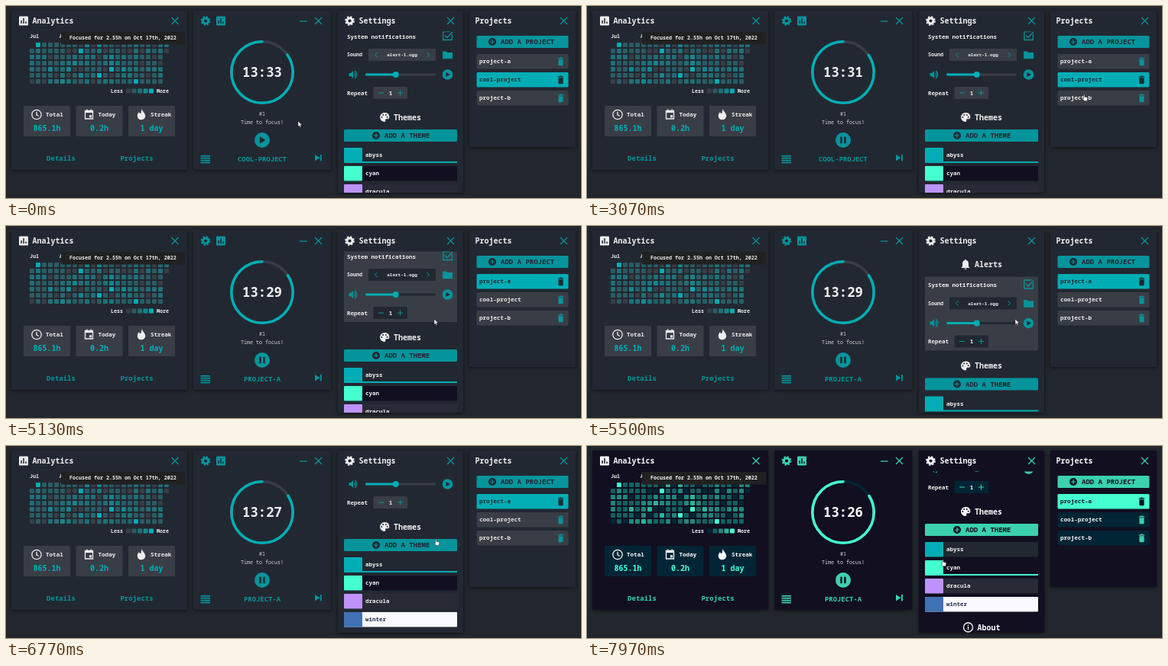
An HTML page that plays this animation: 752 px wide and 252 px high, repeating every 8 s.

```html
<!DOCTYPE html>
<html lang="en">
<head>
<meta charset="utf-8">
<title>Pomodoro timer</title>
<style>
html, body { margin: 0; width: 100%; height: 100%; overflow: hidden; background: #22272e; }
svg { display: block; }
text { font-family: "Noto Sans Mono", "DejaVu Sans Mono", monospace; font-weight: 600; fill: var(--fg); white-space: pre; }
.panel { fill: var(--bg); filter: drop-shadow(0 1px 2px rgba(0,0,0,.55)); }
.bg { fill: var(--bg); } .sec { fill: var(--sec); } .acc { fill: var(--acc); }
.dim { fill: var(--dim); } .fg { fill: var(--fg); } .field { fill: var(--field); } .card { fill: var(--card); }
.line { fill: none; stroke: var(--dim); stroke-width: 1.3; }
.white { fill: none; stroke: var(--fg); stroke-width: 1.3; }
.thin { font-weight: 400; opacity: .88; }
</style>
</head>
<body>
<svg id="stage" width="752" height="252" viewBox="0 0 752 252"></svg>
<script>
const LOOP = 8000;
const stage = document.getElementById('stage');

const THEMES = {
  abyss: { bg: [34, 40, 49], sec: [57, 62, 70], acc: [0, 173, 181], fg: [238, 238, 238] },
  cyan: { bg: [17, 15, 32], sec: [2, 37, 54], acc: [69, 255, 208], fg: [250, 250, 250] }
};

// Maths helpers
const clamp = v => Math.max(0, Math.min(1, v));
const ramp = (t, a, b) => clamp((t - a) / (b - a));
const ease = v => v * v * (3 - 2 * v);
const mix = (a, b, k) => a.map((v, i) => v + (b[i] - v) * k);
const rgb = c => `rgb(${c.map(Math.round).join()})`;
const noise = n => { const v = Math.sin(n * 12.9898 + 4.1) * 43758.5453; return v - Math.floor(v); };

// Drawing helpers
const rect = (x, y, w, h, cls, r = 0, more = '') =>
  `<rect x="${x}" y="${y}" width="${w}" height="${h}" rx="${r}" class="${cls}" ${more}/>`;
const circle = (x, y, r, cls, more = '') => `<circle cx="${x}" cy="${y}" r="${r}" class="${cls}" ${more}/>`;
const path = (d, cls, more = '') => `<path d="${d}" class="${cls}" ${more}/>`;
const at = (x, y, body) => `<g transform="translate(${x} ${y})">${body}</g>`;
const text = (x, y, size, str, cls = '', anchor = 'start', more = '') =>
  `<text x="${x}" y="${(y + size * .35).toFixed(2)}" font-size="${size}" text-anchor="${anchor}" class="${cls}" ${more}>${str}</text>`;
const mid = (x, y, size, str, cls, more) => text(x, y, size, str, cls, 'middle', more);

// Icons
const close = (x, y) => at(x, y, path('M-4.5-4.5 4.5 4.5M4.5-4.5-4.5 4.5', 'line'));
const gear = (x, y, color) => at(x, y,
  `<g fill="none" stroke="var(--${color})"><circle r="3.6" stroke-width="3"/>` +
  `<circle r="5.4" stroke-width="2" stroke-dasharray="2.2 2.04"/></g>`);
const chart = (x, y, cls) => at(x, y, rect(-6, -6, 12, 12, cls, 1.3) +
  rect(-3.7, -.5, 1.5, 4, 'bg') + rect(-.7, -3.5, 1.5, 7, 'bg') + rect(2.3, 1, 1.5, 2.5, 'bg'));
const trash = (x, y, more) => at(x, y, `<g ${more}>` +
  path('M-3.6-4.8h2l.6-.8h2l.6.8h2v1.2h-7.2zM-3.1-2.8h6.2v7q0 1-1 1h-4.2q-1 0-1-1z', '') + '</g>');
const playDisc = (x, y, r) => at(x, y, circle(0, 0, r, 'dim') +
  path(`M${-r * .3} ${-r * .45}V${r * .45}L${r * .5} 0z`, 'bg'));
const addButton = (x, y, w, label, labelX) => rect(x, y, w, 16, 'dim', 1.5) +
  circle(labelX - 11, y + 8, 5, 'bg') +
  at(labelX - 11, y + 8, path('M-3 0H3M0-3V3', '', 'stroke="var(--dim)" stroke-width="1.2"')) +
  text(labelX, y + 8, 9, label, 'bg', 'start', 'style="fill:var(--bg)"');
const panel = (x, w, h) => rect(x, 6, w, h, 'panel', 1.5);

function heatmap() {
  const levels = [0, .28, .45, .65, 1];
  const cell = (x, y, level) => rect(x, y, 6, 6, 'sec', .9) +
    (level ? rect(x, y, 6, 6, 'acc', .9, `opacity="${levels[level]}"`) : '');
  let out = '';
  for (let col = 0; col < 23; col++) {
    for (let row = 0; row < 7; row++) {
      if ((!col && !row) || (col === 22 && row > 1)) continue;
      const n = noise(col * 7 + row);
      const level = n < .2 ? 0 : n < .64 ? 1 : n < .88 ? 2 : n < .98 ? 3 : 4;
      out += cell(31 + col * 8, 48 + row * 8, level);
    }
  }
  levels.forEach((_, i) => { out += cell(157 + i * 7.5, 108.5, i); });
  return out;
}

function analytics() {
  const stat = (x, label, value, icon) => rect(x, 131, 61, 40, 'sec', 1) +
    at(x + 17, 142.5, icon) + text(x + 29, 142.5, 7.6, label) + mid(x + 30.5, 160, 10, value, 'acc');
  const clock = circle(0, 0, 6.2, 'white') + path('M0-3.8V.4L2.8 2', 'white');
  const calendar = path('M-5-5H5V5.5H-5zM-2.6-7v2M2.6-7v2', 'white') +
    rect(-5, -5, 10, 2.6, 'fg') + rect(.5, .8, 3, 3, 'fg');
  const flame = path('M1-7.5C1-4 5.5-2 5.2 2.2 4.8 5.4 2.4 6.8 0 6.8-3 6.8-5.2 4.8-5.2 1.8-5.2-.4-4-2.4-2.8-3.4-2.8-1.8-1.8-1.2-1-1.6.4-2.6-.4-5 1-7.5z', 'fg');
  return panel(7, 230, 209) + chart(23, 19.5, 'fg') + text(34.5, 19.5, 10, 'Analytics') + close(221, 19.5) +
    text(31, 40, 6.7, 'Jul') + text(70, 40, 6.7, 'Aug') + heatmap() +
    rect(72, 34, 162, 16.5, '', 1, 'fill="#212122"') +
    text(83, 42, 6.67, 'Focused for 2.55h on Oct 17th, 2022') +
    text(137, 111.5, 6.7, 'Less') + text(197, 111.5, 6.7, 'More') +
    stat(23, 'Total', '865.1h', clock) + stat(91.5, 'Today', '0.2h', calendar) + stat(160, 'Streak', '1 day', flame) +
    mid(72, 200, 9, 'Details', 'dim') + mid(171, 200, 9, 'Projects', 'dim');
}

function timer() {
  const bars = [0, 1, 2, 3].map(i => rect(254.5, 196 + i * 2.9, 12.5, 1.7, 'dim')).join('');
  return panel(245, 180, 209) + gear(261, 19.5, 'dim') + chart(281, 19.5, 'dim') +
    path('M384 20H393.5', 'line') + close(408.5, 19.5) +
    `<circle cx="335" cy="87" r="40.2" fill="none" stroke="var(--sec)" stroke-width="3.4"/>` +
    `<circle id="ring" r="40.2" fill="none" stroke="var(--acc)" stroke-width="3.6" stroke-linecap="round" ` +
    `pathLength="1" transform="translate(335 87) scale(-1 1) rotate(-90)"/>` +
    mid(335, 87, 17.3, '', '', 'id="clock"') +
    mid(335, 142, 6.7, '#1', 'thin') + mid(335, 153, 6.7, 'Time to focus!', 'thin') +
    circle(335, 176, 10, 'dim') +
    path('M332 171.5V180.5L339.5 176z', 'bg', 'id="play"') +
    path('M331.3 171.8h2.5v8.4h-2.5zM336.2 171.8h2.5v8.4h-2.5z', 'bg', 'id="pause"') +
    bars + mid(335, 200.5, 8.9, '', 'dim', 'id="label"') +
    path('M404 195V203.5L410.5 199.2zM411 195h1.8v8.5H411z', 'dim');
}

function settings() {
  const theme = (y, name, swatch, back, ink = '#f2f2f2') =>
    rect(442, y, 148, 19.5, '', 1, `fill="${back}"`) + rect(442, y, 24, 19.5, '', 1, `fill="${swatch}"`) +
    text(470, y + 9.5, 7.5, name, '', 'start', `style="fill:${ink}"`);
  const bell = path('M0-6.5q1 0 1 1Q4-4.6 4-1V2.5L5.3 4V4.6H-5.3V4L-4 2.5V-1Q-4-4.6-1-5.5-1-6.5 0-6.5zM-1.4 5.3H1.4Q1 6.7 0 6.7T-1.4 5.3z', 'fg');
  const palette = path('M0-6A6 6 0 0 0 0 6Q1.4 6 1.4 4.6 .6 2.2 2.4 2.2H4Q6.4 2.2 6.4-.6 5.8-6 0-6z', 'fg') +
    [[-3.6, 0], [-1.8, -2.9], [1.8, -2.9], [3.7, -.3]].map(p => circle(p[0], p[1], 1, 'bg')).join('');
  const speaker = path('M-5.5-2H-3L.2-5V5L-3 2H-5.5z', 'dim') + path('M2-2.5Q3.6 0 2 2.5M2.4-5Q7 0 2.4 5', 'line');
  const content = at(495, 53, bell) + text(507, 53, 10, 'Alerts') +
    rect(442, 69, 148, 97, 'card', 1.5) +
    text(446, 80, 7.5, 'System notifications') +
    path('M583.3 77V84.5H571.8V73.5H581', 'line') + path('M574 78.5 577 81.5 583.8 74', 'line') +
    text(446, 104, 6.7, 'Sound') + rect(474, 96, 88, 16, 'field', 1.5) +
    path('M485.5 101 482.5 104 485.5 107M550.5 101 553.5 104 550.5 107', 'line', 'style="stroke-width:1"') +
    mid(518, 104, 6, 'alert-1.ogg') +
    path('M571 99.5h4.6l1.4 1.4h7v8.4h-13z', 'dim') +
    at(454, 130, speaker) + rect(470, 128.6, 92, 2.8, 'field', 1.4) +
    rect(470, 128.6, 40, 2.8, 'acc', 1.4) + circle(509.7, 130, 4, 'acc') + playDisc(577.5, 130, 6.8) +
    text(446, 154, 7.5, 'Repeat') + rect(480.5, 146, 44.5, 16, 'field', 1.5) +
    path('M487 154H494M512 154H519M515.5 150.5V157.5', 'line', 'style="stroke-width:1"') + mid(503, 154, 7.5, '1') +
    at(495, 186, palette) + text(507, 186, 10, 'Themes') + addButton(442, 202, 148, 'ADD A THEME', 495) +
    theme(226, 'abyss', '#00adb5', '#222831') + theme(250, 'cyan', '#45ffd0', '#110f20') +
    theme(274, 'dracula', '#bd93f9', '#282a36') + theme(298, 'winter', '#4072b4', '#faf8ff', '#232c52') +
    rect(442, 244, 148, 2, 'acc', 0, 'id="mark"') +
    circle(498.5, 338, 6, 'white') + path('M498.5 337V341.3M498.5 334.6V336', 'white') + text(510.5, 338, 10, 'About');
  return panel(434, 164, 239) + gear(449.5, 19.5, 'fg') + text(461.5, 19.5, 10, 'Settings') + close(581.5, 19.5) +
    `<clipPath id="view"><rect x="434" y="33.5" width="164" height="211.5"/></clipPath>` +
    `<g clip-path="url(#view)"><g id="content">${content}</g></g>`;
}

function projects() {
  const row = (name, i) => {
    const y = 63 + i * 24;
    return `<g id="row${i}">` + rect(615.5, y, 120, 19.5, '', 1.5, 'style="fill:var(--row)"') +
      text(619, y + 9.8, 7.6, name, '', 'start', 'style="fill:var(--ink)"') +
      trash(725.5, y + 10, 'style="fill:var(--bin)"') + '</g>';
  };
  return panel(606, 139, 179) + text(613.5, 19.5, 10, 'Projects') + close(729.5, 19.5) +
    addButton(615.5, 39, 120, 'ADD A PROJECT', 647) + ['project-a', 'cool-project', 'project-b'].map(row).join('');
}

const pointer = '<g id="cursor" fill="#fff" stroke="#111" stroke-width=".5">' +
  '<path id="arrow" d="M0 0V7.4L1.7 5.9 2.9 8.6 4 8.1 2.9 5.5H5.2z"/>' +
  '<path id="hand" d="M1.6.5Q2.3-.2 3 .5V3.2L6 3.8Q7 4 6.8 5.2L6.2 8.8H2.6L.3 5.8Q.4 4.7 1.6 5.4z"/></g>';

stage.innerHTML = analytics() + timer() + settings() + projects() + pointer;
const el = id => document.getElementById(id);
const show = (id, on) => el(id).setAttribute('visibility', on ? 'visible' : 'hidden');
const move = (id, x, y) => el(id).setAttribute('transform', `translate(${x.toFixed(2)} ${y.toFixed(2)})`);

// Pointer stops: time, x, y, hand shape
const STOPS = [
  [0, 382, 151], [270, 382, 151], [400, 376, 68], [540, 434, 130], [680, 400, 218], [830, 342, 172, 1],
  [1370, 342, 172, 1], [1530, 337, 172, 1], [1640, 302, 110], [1780, 400, 8], [1950, 644, 70],
  [2070, 560, 155], [2170, 433, 162], [2270, 377, 142], [2600, 377, 142], [2700, 302, 100],
  [2820, 400, 8], [2960, 590, 60], [3070, 648, 116, 1], [3300, 648, 116, 1], [3730, 651, 76, 1],
  [4350, 651, 76, 1], [4600, 650, 124], [4900, 578, 126], [5130, 560, 122], [6770, 560, 122, 1],
  [6930, 560, 122], [7230, 513, 146], [7650, 463, 149, 1], [8000, 463, 149, 1]
];

function pointerAt(t) {
  let i = 0;
  while (i < STOPS.length - 2 && STOPS[i + 1][0] <= t) i++;
  const a = STOPS[i], b = STOPS[i + 1];
  const before = STOPS[Math.max(0, i - 1)], after = STOPS[Math.min(STOPS.length - 1, i + 2)];
  const u = ramp(t, a[0], b[0]);
  const along = n => {
    if (a[1] === b[1] && a[2] === b[2]) return a[n];
    const m = (b[n] - before[n]) / 2, k = (after[n] - a[n]) / 2;
    return a[n] + u * (m + u * (3 * (b[n] - a[n]) - 2 * m - k + u * (2 * (a[n] - b[n]) + m + k)));
  };
  return { x: along(1), y: along(2), hand: !!a[3] };
}

function render(t) {
  const k = ramp(t, 7800, 7960);
  const c = {};
  for (const key in THEMES.abyss) c[key] = mix(THEMES.abyss[key], THEMES.cyan[key], k);
  c.dim = mix(c.bg, c.acc, .81);
  const hover = ramp(t, 4940, 5120) * (1 - ramp(t, 6440, 6620));
  c.card = mix(c.bg, c.sec, hover);
  c.field = mix(c.sec, c.bg, hover);
  for (const key in c) stage.style.setProperty('--' + key, rgb(c[key]));

  const picked = ramp(t, 4070, 4230);
  [picked, 1 - picked, 0].forEach((on, i) => {
    const style = el('row' + i).style;
    style.setProperty('--row', rgb(mix(c.sec, c.acc, on)));
    style.setProperty('--ink', rgb(mix(c.fg, c.bg, on)));
    style.setProperty('--bin', rgb(mix(c.dim, c.bg, on)));
  });
  el('label').textContent = t < 4100 ? 'COOL-PROJECT' : 'PROJECT-A';

  const left = 33 - Math.max(0, Math.floor((t - 630) / 1000));
  el('clock').textContent = '13:' + left;
  el('ring').setAttribute('stroke-dasharray', `${(780 + left) / 960} 2`);
  show('play', t < 1070);
  show('pause', t >= 1070);

  const scroll = 40 - 40 * ease(ramp(t, 5340, 5530)) + 80 * ease(ramp(t, 6400, 6630)) + 20 * ease(ramp(t, 6900, 7070));
  move('content', 0, -scroll);
  el('mark').setAttribute('y', t < 7830 ? 244 : 268);

  const p = pointerAt(t);
  move('cursor', p.x, p.y);
  show('arrow', !p.hand);
  show('hand', p.hand);
}

const start = performance.now();
function frame() {
  render((performance.now() - start) % LOOP);
  requestAnimationFrame(frame);
}
frame();
</script>
</body>
</html>
```
